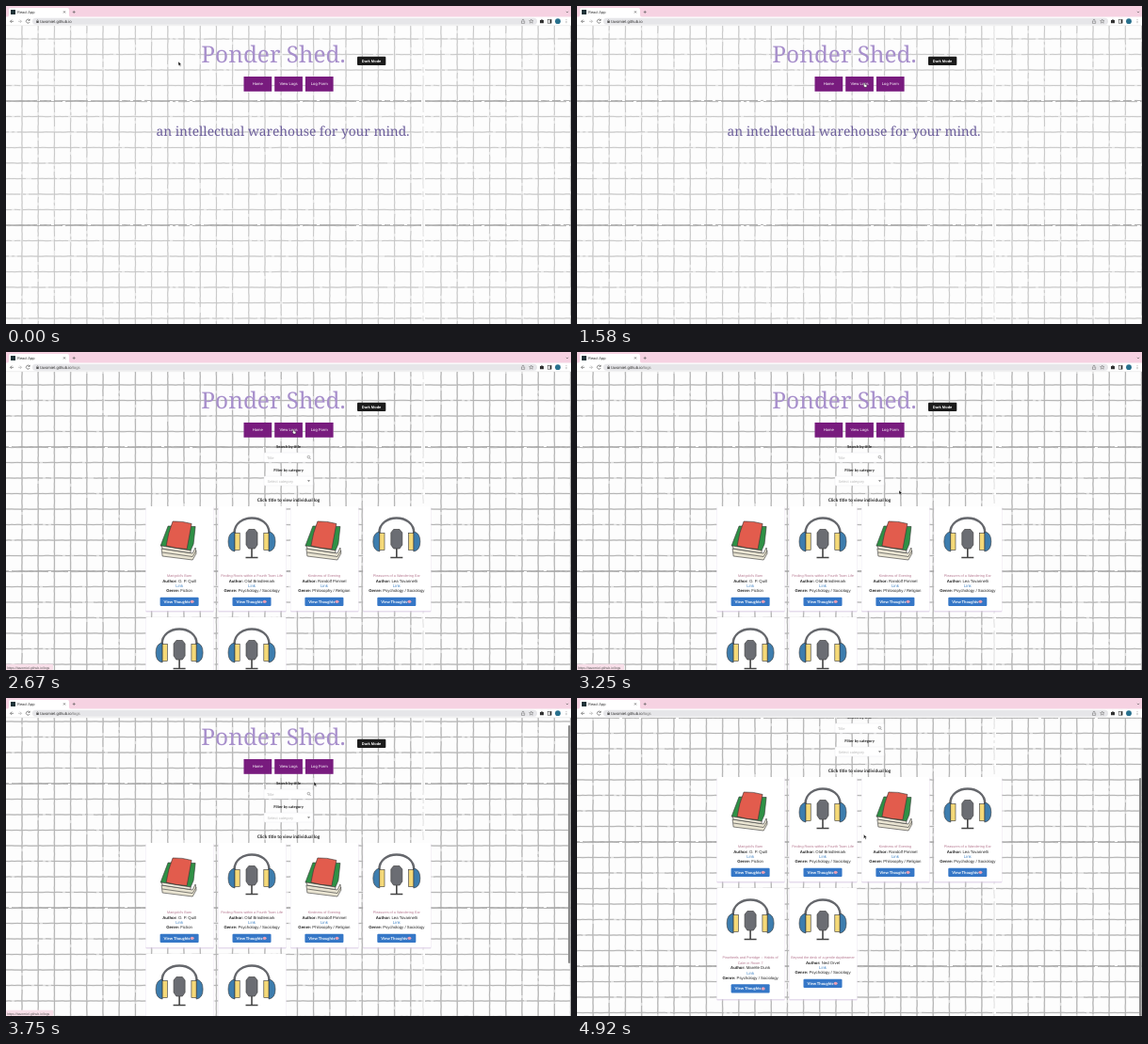
These frames come from a looping animation (600x338 px, 5010 ms). An HTML page:

```html
<!DOCTYPE html>
<html lang="en">
<head>
<meta charset="utf-8">
<title>React App</title>
<style>
  html, body { margin: 0; width: 100%; height: 100%; overflow: hidden; background: #fff; }
  svg { display: block; width: 600px; height: 338px; }
  text { font-family: "Liberation Sans", Arial, sans-serif; white-space: pre; text-rendering: geometricPrecision; }
  .serif { font-family: "Noto Serif", Georgia, serif; }
  .lato { font-family: Lato, sans-serif; font-weight: 700; }
  .mid { text-anchor: middle; }
  .b { font-weight: 700; }
</style>
</head>
<body>
<svg id="stage" viewBox="0 0 600 338"></svg>
<script>
const FRAME = 1000 / 12, FRAMES = 60, LOOP = 5010;
const PAGE_SWITCH = 21, STATUS_END = 46, SCROLLBAR_START = 45;
const HOST = 'tavomiel.github.io';

let seed = 7;
const rand = () => (seed = seed * 16807 % 2147483647) / 2147483647;

const rect = (x, y, w, h, fill, extra = '') =>
  `<rect x="${x}" y="${y}" width="${w}" height="${h}" fill="${fill}" ${extra}/>`;
const text = (x, y, size, fill, str, cls = 'mid') =>
  `<text x="${x}" y="${y}" font-size="${size}" fill="${fill}" class="${cls}">${str}</text>`;
const path = (d, fill, stroke = 'none', width = 1) =>
  `<path d="${d}" fill="${fill}" stroke="${stroke}" stroke-width="${width}"/>`;

// Pencil-like grid tile: a soft straight line under a slightly rough one
const TILE_W = 445, TILE_H = 132;
function pencil(length, at, vertical, rough) {
  let d = '';
  for (let s = 0; s <= length; s += rough ? 3 : length) {
    const q = (at + (rand() - .5) * rough).toFixed(2);
    d += (s && (!rough || rand() > .06) ? 'L' : 'M') + (vertical ? `${q} ${s}` : `${s} ${q}`);
  }
  return d;
}
function gridLines(rough) {
  let d = '';
  for (let x = 17; x < 440; x += 17.2) d += pencil(TILE_H, x, true, rough);
  for (let y = 16.5; y < TILE_H - 1; y += 16.5) d += pencil(443, y, false, rough);
  return d;
}
function gridTile(id, soft, color, width) {
  const edge = pencil(443, .5, false, .4) + pencil(443, TILE_H - .4, false, .4);
  return `<pattern id="${id}" width="${TILE_W}" height="${TILE_H}" patternUnits="userSpaceOnUse" patternTransform="translate(0 -31)">` +
    path(gridLines(0), 'none', soft, width + .6) + path(gridLines(.5), 'none', color, width) +
    path(edge, 'none', '#a6a6a6', .9) + path(pencil(TILE_H, 443, true, .4), 'none', '#d0d0d0', .7) + '</pattern>';
}

function books() {
  const line = '#333', w = .6;
  return path('M-19 45L14 50 17 44 18 50 14 57-18 53Z', '#e9e4d2', line, w) +
    path('M-18 49L14 53.5 18 47', 'none', line, w) +
    path('M-12 21L17 21.5 15 40 12 47-20 42Z', '#2f9146', line, w) +
    path('M-19 42L12 47 12 49.5-18 45Z', '#f3efe0', line, w) +
    path('M-7 16Q3 15.5 13 18.5L8 45.5Q-3 45-14 42Q-12 28-7 16Z', '#e25c4d', line, w);
}
function headphones() {
  const side = path('M-18 27Q-25 28-25 37.5T-18 48Z', '#3d7dae', '#333', .6) +
    rect(-18, 28.5, 5.2, 18, '#f5d978', 'stroke="#333" stroke-width=".6"');
  return path('M-18.5 29C-19 7 19 7 18.5 29', 'none', '#65676c', 2.4) +
    side + `<g transform="scale(-1 1)">${side}</g>` +
    path('M0 44V54M-6.5 54.5H6.5', 'none', '#444', 1.6) +
    path('M-3.2 24.5H3.2L6 28V41L3.2 45H-3.2L-6 41V28Z', '#6b6d73', '#444', .7);
}

const PSY = 'Psychology / Sociology';
const cards = [
  [books, ['Marigold’s Barn'], 'O. P. Quill', 'Fiction'],
  [headphones, ['Finding Roots within a Fourth Town Life'], 'Olaf Brindlemark', PSY],
  [books, ['Kindness of Evening'], 'Randolf Pimmel', 'Philosophy / Religion'],
  [headphones, ['Pleasures of a Wandering Ear'], 'Lea Tovarinelli', PSY],
  [headphones, ['Pinwheels and Porridge -- Habits of', 'Calm in Room 7'], 'Marelle Dunk', PSY],
  [headphones, ['Beyond the desk of a gentle daydreamer'], 'Ned Orvel', PSY]
];
function card([icon, titles, author, genre], i) {
  const row = i >> 2, h = row ? 118 : 111, drop = (titles.length - 1) * 5.6;
  const field = (y, label, value) =>
    text(0, y, 4.3, '#222', `<tspan class="b">${label}:</tspan> ${value}`);
  return `<g transform="translate(${184.1 + 76.9 * (i & 3)} ${164 + 118 * row})">` +
    rect(-35.8, .6, 72.4, h + .8, '#d9c9e4', 'rx="1" opacity=".65"') +
    rect(-35.6, 0, 72, h, '#fff', 'rx="1"') + icon() +
    titles.map((t, n) => text(0, 75.4 + 5.6 * n, 3.75, '#b5778f', t)).join('') +
    `<g transform="translate(0 ${drop})">` +
    field(80.7, 'Author', author) + text(0, 86.2, 4.3, '#4183c4', 'Link') +
    field(91.4, 'Genre', genre) +
    rect(-20.5, 96.7, 41, 9.3, '#3577c7', 'rx="1"') +
    text(-2.6, 102.9, 4.2, '#fff', 'View Thoughts', 'lato mid') +
    '<ellipse cx="13.6" cy="101.3" rx="2" ry="1.6" fill="#e8a0b4"/></g></g>';
}

function header() {
  return text(284, 60, 24.4, '#a890cc', 'Ponder Shed.', 'serif mid') +
    rect(373, 53.7, 30.3, 9.2, '#1b1b1b', 'rx="1"') + text(388.1, 59.8, 4, '#fff', 'Dark Mode', 'b mid') +
    ['Home', 'View Logs', 'Log Form'].map((label, i) =>
      rect(252.5 + 32.7 * i, 75, 29.7, 15.8, '#781b7e') +
      text(267.3 + 32.7 * i, 84.4, 4.2, '#fff', label)).join('');
}
const home = () =>
  text(294, 137.8, 13.75, '#6c5e9b', 'an intellectual warehouse for your mind.', 'serif mid');

function logs() {
  const box = y => rect(274, y, 52, 10, '#fff', 'rx="1" stroke="#e6e3e8" stroke-width=".4"');
  return text(300, 102, 4.1, '#222', 'Search by title', 'lato mid') + box(107) +
    text(277, 113.5, 4, '#bbb', 'Title', '') +
    '<circle cx="321.4" cy="111.6" r="1.3" fill="none" stroke="#777" stroke-width=".6"/>' +
    path('M322.3 112.6L323.6 114', 'none', '#777', .6) +
    text(300, 126.6, 4.1, '#222', 'Filter by category', 'lato mid') + box(132) +
    text(277.5, 138.5, 4, '#bbb', 'Select category', '') +
    path('M320 136.3H323L321.5 138Z', '#777') +
    text(300, 158.8, 4.8, '#222', 'Click title to view individual log', 'lato mid') +
    cards.map(card).join('');
}

function browser() {
  const ink = '#555';
  return rect(0, 0, 600, 12, '#f6d2e2') + path('M1 12Q3 12 3 9V4Q3 2 5 2H65Q67 2 67 4V9Q67 12 69 12Z', '#fff') +
    rect(0, 11.5, 600, 9.5, '#fff') + rect(0, 20.6, 600, .5, '#ddd') +
    rect(5, 4, 5, 5, '#1f3338') + text(12, 8, 4, '#333', 'React App', '') +
    path('M61 5.3L63 7.5M63 5.3L61 7.5M70.7 6.4H73.7M72.2 4.9V7.9M594.8 5.8L596 7 597.2 5.8', 'none', ink, .6) +
    rect(28, 12.8, 536, 7, '#e6e6e9', 'rx="3.5"') +
    path('M8 16.3H4.6M6.2 14.6L4.5 16.3 6.2 18M25 15A2 2 0 1 0 25.2 17M25.2 13.8V15.4H23.5', 'none', ink, .65) +
    path('M13 16.3H16.4M14.8 14.6L16.5 16.3 14.8 18', 'none', '#aaa', .65) +
    rect(32.3, 15.8, 2.4, 2.2, ink) + path('M32.8 16V15.2Q33.5 13.8 34.2 15.2V16', 'none', ink, .4) +
    text(36.2, 17.7, 4.3, '#333', `${HOST}<tspan id="slug" fill="#777">/logs</tspan>`, '') +
    path('M548 15.8H547.5V18.4H550.7V15.8H550.2M549.1 17V14M548.2 14.8L549.1 13.9 550 14.8', 'none', ink, .45) +
    path('M557.8 14L558.4 15.5 560 15.6 558.8 16.6 559.2 18.2 557.8 17.3 556.4 18.2 556.8 16.6 555.6 15.6 557.2 15.5Z', 'none', ink, .4) +
    path('M567 15H568.2Q569 13 569.8 15H571V18.3H567Z', '#333') +
    rect(575.6, 14.4, 3.5, 3.8, 'none', 'stroke="#333" stroke-width=".5"') + rect(577.6, 14.4, 1.5, 3.8, '#333') +
    '<circle cx="586" cy="16.2" r="2.9" fill="#28708d"/>' +
    [14.6, 16.2, 17.8].map(y => `<circle cx="595" cy="${y}" r=".45" fill="${ink}"/>`).join('');
}

const $ = id => document.getElementById(id);
$('stage').innerHTML =
  `<defs>${gridTile('lightGrid', '#e6e6e6', '#c2c2c2', .8)}${gridTile('darkGrid', '#dcdcdc', '#b4b4b4', 1)}</defs>` +
  `<g id="page">${rect(0, 0, 600, 430, '#fdfdfd')}` +
  `<g id="home">${rect(0, 0, 600, 430, 'url(#lightGrid)')}${home()}</g>` +
  `<g id="logs">${rect(0, 0, 600, 430, 'url(#darkGrid)')}${logs()}</g>${header()}</g>` +
  rect(597, 29, 2.2, 253, '#8b8b8b', 'id="thumb" rx="1.1"') +
  `<g id="status">${rect(0, 331.8, 50, 6.2, '#f8dfe9', 'rx="1"')}` +
  `${text(1.2, 336.5, 3.5, '#555', `https://${HOST}/logs`, '')}</g>` + browser() +
  '<g id="cursor">' +
  `<g id="arrow">${path('M0 0V4.6L1.1 3.6 1.9 5.3 2.7 4.9 2 3.3H3.4Z', '#111', '#fff', .4)}</g>` +
  `<g id="hand">${path('M.8 0Q1.4 0 1.4 .6V1.8L3.3 2.3Q3.6 3.7 2.9 4.7H.9L-.5 2.8 .2 2.6V.6Q.2 0 .8 0Z', '#fff', '#222', .45)}</g></g>`;

// [frame, x, y] and [frame, offset]
const cursorKeys = [[0, 183, 59], [1, 183, 59], [7, 240, 72], [11, 240, 72], [17, 304.5, 81.5], [35, 304.5, 82.5],
  [39, 342, 147], [42, 342, 147], [45, 327, 89], [46, 323, 75.5], [48, 323, 75.5], [55, 304.5, 145], [60, 304.5, 145]];
const scrollKeys = [[0, 0], [44, 0], [45, 10], [46, 80], [60, 80]];

function sample(keys, frame) {
  const i = Math.max(1, keys.findIndex(k => k[0] >= frame)), a = keys[i - 1], b = keys[i];
  const p = (frame - a[0]) / (b[0] - a[0]);
  return a.slice(1).map((v, n) => v + (b[n + 1] - v) * p);
}
const show = (id, on) => $(id).setAttribute('display', on ? 'inline' : 'none');
const move = (id, x, y) => $(id).setAttribute('transform', `translate(${x} ${y})`);

function draw(now) {
  const frame = Math.min(FRAMES - 1, Math.floor((now % LOOP + 4) / FRAME));
  const onLogs = frame >= PAGE_SWITCH;
  const [x, y] = sample(cursorKeys, frame), [scroll] = sample(scrollKeys, frame);
  const overLink = x > 285 && x < 315 && y > 75 && y < 91 && frame < SCROLLBAR_START;
  show('home', !onLogs);
  show('logs', onLogs);
  show('slug', onLogs);
  show('status', onLogs && frame < STATUS_END);
  show('thumb', frame >= SCROLLBAR_START);
  show('hand', overLink);
  show('arrow', !overLink);
  move('page', 0, -scroll);
  move('thumb', 0, (scroll - 10) * .8);
  move('cursor', x, y);
}
const start = performance.now();
function tick() {
  draw(performance.now() - start);
  requestAnimationFrame(tick);
}
tick();
</script>
</body>
</html>
```
